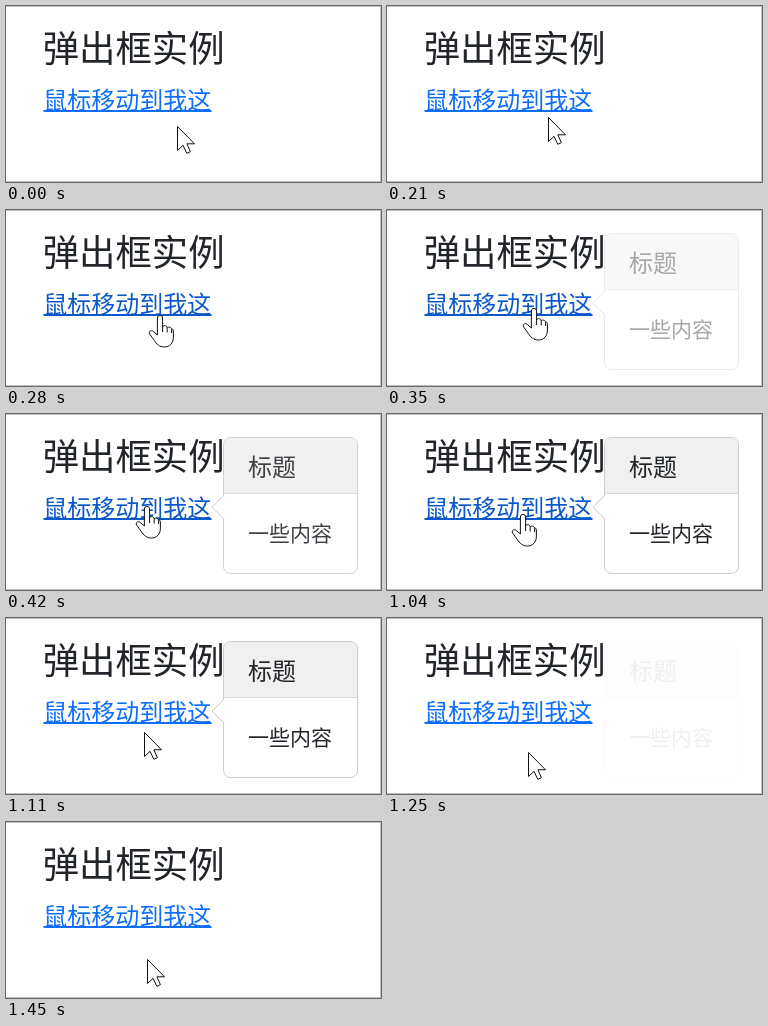
An HTML page for the animation above (1580 ms loop, 375 by 176 pixels).

```html
<!DOCTYPE html>
<html lang="zh-CN">
<head>
<meta charset="utf-8">
<title>弹出框实例</title>
<style>
  html, body { margin: 0; width: 100%; height: 100%; overflow: hidden; background: #fff; }
  svg { display: block; width: 375px; height: 176px; }
  text { font-family: "Noto Sans CJK SC", "Noto Sans CJK", sans-serif; font-weight: 350; fill: #212529; }
  #link text { fill: currentColor; }
  #link { color: #0d6efd; }
  #link.hover { color: #0a58ca; }
  .cursor { fill: #fff; stroke: #111; stroke-linejoin: round; }
</style>
</head>
<body>
<svg viewBox="0 0 375 176">
  <path d="M0 .5H374.5V175.5H0" fill="none" stroke="#bfbfbf"/>
  <text x="36.7" y="55.8" font-size="36.4">弹出框实例</text>
  <g id="link">
    <text x="37.3" y="102.6" font-size="24">鼠标移动到我这</text>
    <path d="M37.5 105H205.5" stroke="currentColor" stroke-width="2"/>
  </g>
  <g id="popover">
    <rect x="217.5" y="23.5" width="134" height="136" rx="7" fill="#fff"/>
    <path d="M218 79V31a7 7 0 0 1 7-7H344a7 7 0 0 1 7 7V79Z" fill="#f0f0f0"/>
    <path d="M218 79.5H351" stroke="#d8d8d8"/>
    <rect x="217.5" y="23.5" width="134" height="136" rx="7" fill="none" stroke="#ccc"/>
    <path d="M218.2 81L206 93.2L218.2 105.4" fill="#fff" stroke="#c4c4c4"/>
    <text x="242" y="61.6" font-size="24">标题</text>
    <text x="242" y="126.7" font-size="21">一些内容</text>
  </g>
  <path id="arrow" class="cursor" d="M.5 .5V24.5L6 19.3L9.8 27.3L13.4 25.7L9.9 17.8H17.5Z"/>
  <g id="hand" class="cursor">
    <path d="M-2.6 20V3C-2.6-.4 2.6-.4 2.6 3V12C3.3 9.8 7.2 10.2 7.2 13C8.3 11.3 11.6 12 11.6 14.6
      C12.6 13.4 13.4 14.6 13.4 17V22C13.4 28 10 32 4.5 32C-.5 32-3.6 29-5.6 25.6
      L-10.4 19C-11.8 16.4-8.8 14.6-6.8 16.4Z"/>
    <path d="M2.6 12V17M7.2 13V17.5M11.6 14.6V18" fill="none"/>
  </g>
</svg>
<script>
const LOOP = 1580, FRAME = 70, LEAVE = 1040, FADE = 150;
const LINK_BOTTOM = 107, FADE_IN = 290, FADE_OUT = 1110;
const [link, popover, arrow, hand] =
  ["link", "popover", "arrow", "hand"].map(id => document.getElementById(id));

const clamp = v => Math.min(1, Math.max(0, v));
const smooth = p => p * p * (3 - 2 * p);
const mix = (a, b, p) => a + (b - a) * p;
const glide = (from, to, p) => from.map((a, i) => mix(a, to[i], smooth(p)));

function pointer(time) {
  return time < LEAVE
    ? glide([171, 120], [139, 90], clamp(time / (7 * FRAME)) ** 1.2)
    : glide([135, 90], [141, 137], clamp((time - LEAVE + FRAME) / (5 * FRAME)) ** .75);
}

function draw(now) {
  const loopTime = now % LOOP;
  const phase = loopTime < LEAVE ? 0 : LEAVE;
  const time = phase + Math.floor((loopTime - phase) / FRAME) * FRAME;
  const [x, y] = pointer(time).map(Math.round);
  const over = y < LINK_BOTTOM;

  link.classList.toggle("hover", over);
  popover.style.opacity = clamp((time - FADE_IN) / FADE) * clamp(1 - (time - FADE_OUT) / FADE);
  for (const [node, shown] of [[arrow, !over], [hand, over]]) {
    node.setAttribute("transform", `translate(${x} ${y})`);
    node.style.display = shown ? "" : "none";
  }
}

const start = performance.now();
function tick() {
  draw(performance.now() - start);
  requestAnimationFrame(tick);
}
tick();
</script>
</body>
</html>
```
